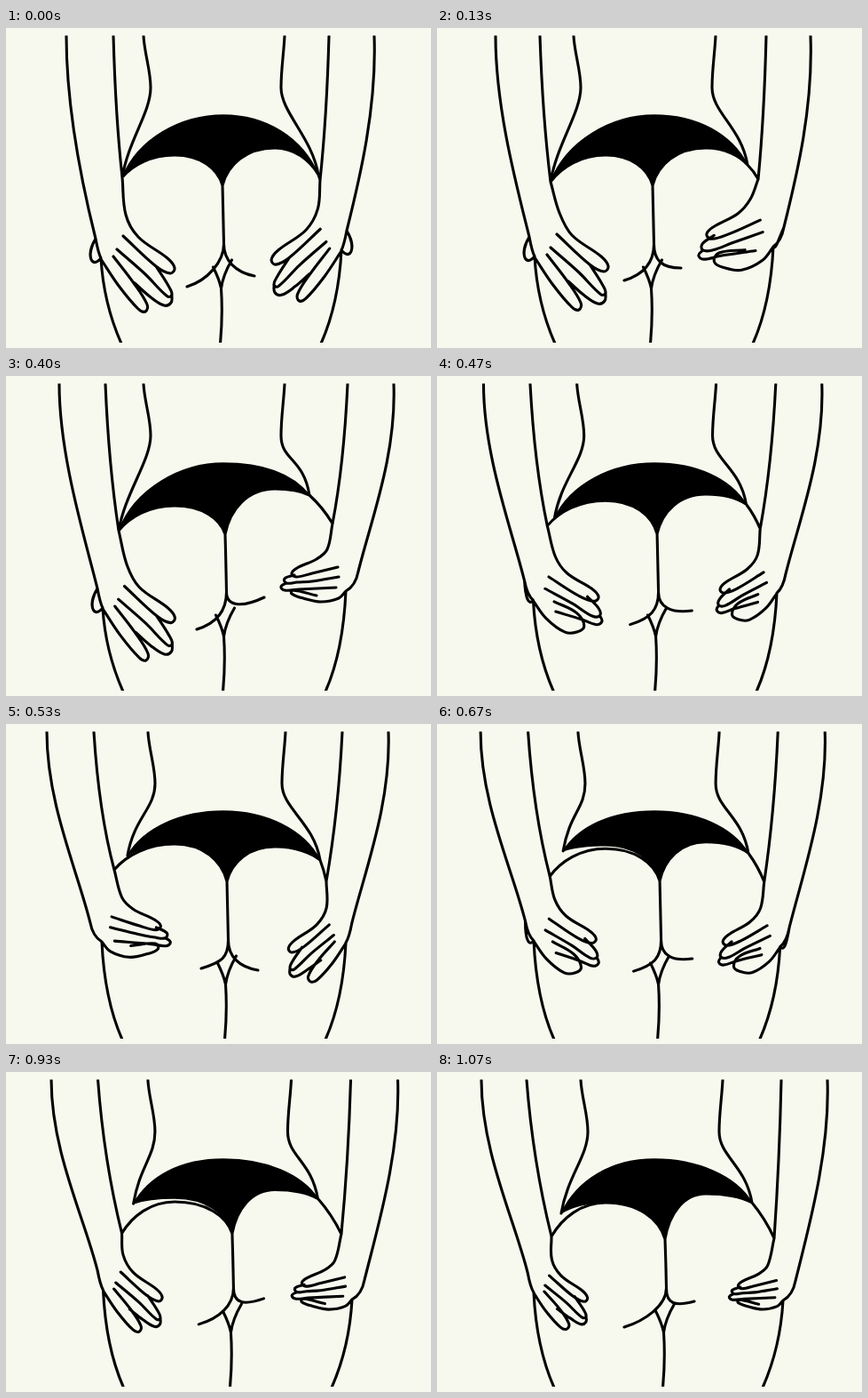
These frames come from a looping animation (479x360 px, 1.14 s). An HTML page:

```html
<!DOCTYPE html>
<html lang="en">
<head>
<meta charset="utf-8">
<style>
html, body { margin: 0; width: 100%; height: 100%; overflow: hidden; background: #f7f8ee; }
svg { display: block; width: 100vw; height: 100vh; }
path { fill: none; stroke-linecap: round; stroke-linejoin: round; }
.ink { stroke: #000; }
.core { stroke: #f7f8ee; stroke-width: 2.2; }
.brief { fill: #000; stroke: #000; stroke-width: 1.4; }
</style>
</head>
<body>
<svg viewBox="0 0 479 360">
  <clipPath id="crop"><rect y="8.5" width="479" height="345.5"/></clipPath>
  <g id="art" clip-path="url(#crop)"></g>
</svg>
<script>
const LOOP = 1140;
const KEYS = [0, 130, 270, 400, 530, 800, 1070];
const STEPS = [0, 70, 130, 270, 330, 400, 470, 530, 600, 670, 730, 800, 870, 930, 1070];
const HOLLOW_AT = 800;

// Tracks hold one value per key time and read the current blend.
let from = 0, to = 0, blend = 0;
const lerp = (a, b, u) => a + (b - a) * u;
const track = v => () => lerp(v[from], v[to], blend);
const point = (xs, ys) => {
  const x = track(xs), y = track(ys);
  return () => [x(), y()];
};

const left = {
  dir: 1,
  outer: track([68, 66, 64, 60, 46, 52, 50]),
  inner: track([121, 116, 115, 112, 99, 106, 101]),
  waist: track([155, 154, 154, 155, 160, 158, 162]),
  joint: point([131, 128, 126, 127, 122, 132, 129], [168, 173, 178, 174, 164, 178, 185]),
  wrist: point([107, 110, 108, 109, 108, 110, 109], [259, 257, 260, 261, 245, 243, 248]),
  grip: track([0, 0, 0, 0, 0.9, 0, 0.1]),
  size: track([1, 1, 0.97, 0.98, 1.05, 0.87, 0.75])
};
const right = {
  dir: -1,
  outer: track([415, 421, 430, 437, 431, 443, 440]),
  inner: track([364, 371, 381, 385, 379, 389, 388]),
  waist: track([314, 314, 313, 314, 315, 321, 322]),
  joint: point([354, 362, 366, 368, 361, 376, 380], [171, 170, 162, 166, 177, 178, 187]),
  wrist: point([378, 379, 381, 383, 383, 390, 390], [250, 246, 238, 242, 246, 255, 257]),
  grip: track([0, 0.75, 1, 1, 0.1, 1, 1]),
  size: track([0.95, 1.13, 1.03, 1, 0.8, 1.02, 0.83])
};
left.corner = point([131, 128, 126, 127, 137, 147, 140], [168, 173, 178, 174, 148, 138, 159]);
right.corner = point([352, 350, 341, 342, 354, 348, 355], [165, 154, 131, 134, 153, 138, 147]);
const cusp = point([244, 243, 247, 247, 249, 253, 257], [177, 177, 175, 178, 177, 176, 188]);
const archL = track([143, 143, 143, 146, 135, 145, 147]);
const archR = track([135, 135, 122, 127, 138, 128, 137]);
const foldL = point([204, 211, 214, 215, 220, 223, 211], [291, 284, 284, 285, 275, 281, 287]);
const foldR = point([280, 275, 284, 291, 284, 291, 290], [279, 270, 244, 249, 277, 252, 258]);

// Hand lines relative to the wrist: hanging and gripping.
const palm = [
  [[28, -49], [42, -24], [75, 0], [83, 11], [78, 17], [62, 9], [25, -25]],
  [[21, -47], [33, -36], [55, -26], [61, -20], [56, -16], [38, -20], [9, -27]]
];
const middle = [
  [[62, 9], [76, 31], [80, 41], [75, 43], [50, 18], [18, -10]],
  [[58, -18], [69, -14], [67, -9], [55, -10], [38, -11], [8, -16]]
];
const ring = [
  [[80, 41], [79, 50], [71, 53], [55, 43], [38, 28]],
  [[67, -9], [73, -5], [69, -1], [53, -2], [11, -4]]
];
const little = [
  [[0, 1], [20, 31], [42, 57], [50, 60], [52, 52], [37, 28], [14, -2]],
  [[0, 0], [8, 8], [28, 12], [48, 8], [61, 3], [60, -1], [33, 5]]
];

const seg = (cmd, ...pts) => cmd + pts.map(p => p.map(n => n.toFixed(2))).join(" ");
const shift = (p, dx, dy) => [p[0] + dx, p[1] + dy];

function heading(pts, i) {
  const a = pts[Math.max(i - 1, 0)], b = pts[Math.min(i + 1, pts.length - 1)];
  const dx = b[0] - a[0], dy = b[1] - a[1], len = Math.hypot(dx, dy) || 1;
  return [dx / len, dy / len];
}

// Smooth curve through points; handles scale with segment length.
function curve(pts) {
  let d = seg("M", pts[0]);
  for (let i = 1; i < pts.length; i++) {
    const a = pts[i - 1], b = pts[i];
    const h = Math.hypot(b[0] - a[0], b[1] - a[1]) * 0.35;
    const u = heading(pts, i - 1), v = heading(pts, i);
    d += seg("C", shift(a, u[0] * h, u[1] * h), shift(b, -v[0] * h, -v[1] * h), b);
  }
  return d;
}

// Half an arch, from its flat top down to one foot, or back up.
function arch(top, foot, up, flat = 0.45, lean = 0.2) {
  const dx = foot[0] - top[0], dy = foot[1] - top[1];
  const a = shift(top, dx * flat, 0), b = shift(foot, -dx * lean, -dy * 0.55);
  return up ? seg("C", b, a, top) : seg("C", a, b, foot);
}
const innerArch = (top, foot, up) => arch(top, foot, up, 0.55, 0.1);

function side(s) {
  const { dir } = s, w = s.wrist(), j = s.joint(), c = s.corner();
  const grip = s.grip(), size = s.size();
  const outer = [s.outer(), 9], inner = [s.inner(), 9], waist = [s.waist(), 9];
  const k = shift(w, -dir * (6 + 8 * grip), -22);

  let d = seg("M", outer) + seg("C", shift(outer, dir < 0 ? 3 : 0, 80), shift(k, -dir * 15, -60), k)
    + seg("Q", [k[0] + dir * 3, w[1] - 6], w)
    + seg("Q", [w[0] + dir * 3, 310], [w[0] + dir * 23, 355]);
  d += seg("M", inner) + seg("Q", [lerp(inner[0], j[0], 0.25), 100], j);

  const hip = shift(waist, dir > 0 ? 8 : -4, 58);
  d += seg("M", waist) + seg("C", shift(waist, dir, 20), shift(hip, 0, -20), hip)
    + seg("C", shift(hip, 0, 28), [c[0] + dir * 7, c[1] - 42], c);

  const place = pair => pair[0].map((p, i) => [
    w[0] + dir * size * lerp(p[0], pair[1][i][0], grip),
    w[1] + size * lerp(p[1], pair[1][i][1], grip)
  ]);
  d += curve([j, ...place(palm)]) + [middle, ring, little].map(f => curve(place(f))).join("");

  const thumb = size > 0.9 ? 1 - grip : 0;
  if (thumb > 0.15) {
    d += seg("M", k) + seg("C", shift(w, -dir * 17 * thumb, -4), shift(w, -dir * 11 * thumb, 13 * thumb), w);
  }
  return d;
}

function folds(c) {
  const v = [c[0] + 1.5, 243], n = [v[0] - 3, 293], l = foldL(), r = foldR();
  return seg("M", c) + seg("Q", [c[0] + 1, 215], v) + seg("C", shift(v, 0, 20), shift(l, 23, -7), l)
    + seg("M", v) + seg("C", shift(v, 0, 18), [r[0] - 22, (r[1] + 270) / 2], r)
    + seg("M", shift(v, -12, 26)) + seg("Q", shift(n, -2, -10), n) + seg("Q", shift(n, 2, 30), [n[0] - 1, 355])
    + seg("M", shift(v, 9, 18)) + seg("Q", shift(n, 2, -15), n);
}

const art = document.getElementById("art");
function addPath(cls) {
  const el = document.createElementNS("http://www.w3.org/2000/svg", "path");
  el.setAttribute("class", cls);
  return art.appendChild(el);
}
const ink = addPath("ink"), core = addPath("core"), cloth = addPath("brief");

function draw(t) {
  from = KEYS.filter(k => k <= t).length - 1;
  to = Math.min(from + 1, KEYS.length - 1);
  blend = to > from ? (t - KEYS[from]) / (KEYS[to] - KEYS[from]) : 0;

  const c = cusp(), l = left.corner(), r = right.corner(), j = right.joint();
  const topL = [190, archL()], topR = [303, archR()], peak = [245, 98];
  const hemL = [190, Math.min(topL[1], l[1] - 6)];

  const d = side(left) + side(right) + folds(c)
    + seg("M", c) + innerArch(topL, c, true) + arch(topL, left.joint())
    + seg("M", c) + innerArch(topR, c, true) + arch(topR, r)
    + seg("Q", [lerp(r[0], j[0], 0.6), lerp(r[1], j[1], 0.45)], j);
  const hollow = t === HOLLOW_AT;
  ink.setAttribute("d", d);
  ink.setAttribute("stroke-width", hollow ? 4 : 3.1);
  core.setAttribute("d", hollow ? d : "");

  cloth.setAttribute("d", seg("M", l)
    + seg("C", [l[0] + 18, lerp(l[1], 98, 0.62)], shift(peak, -48, 0), peak)
    + seg("C", shift(peak, 48, 0), [r[0] - 18, lerp(r[1], 98, 0.62)], r)
    + arch(topR, r, true) + innerArch(topR, c)
    + innerArch(hemL, c, true) + arch(hemL, l) + "Z");
}

let shown = -1;
const origin = performance.now();
function tick() {
  const t = (performance.now() - origin) % LOOP;
  const step = STEPS.filter(s => s <= t).pop();
  if (step !== shown) draw(shown = step);
  requestAnimationFrame(tick);
}
tick();
</script>
</body>
</html>
```
